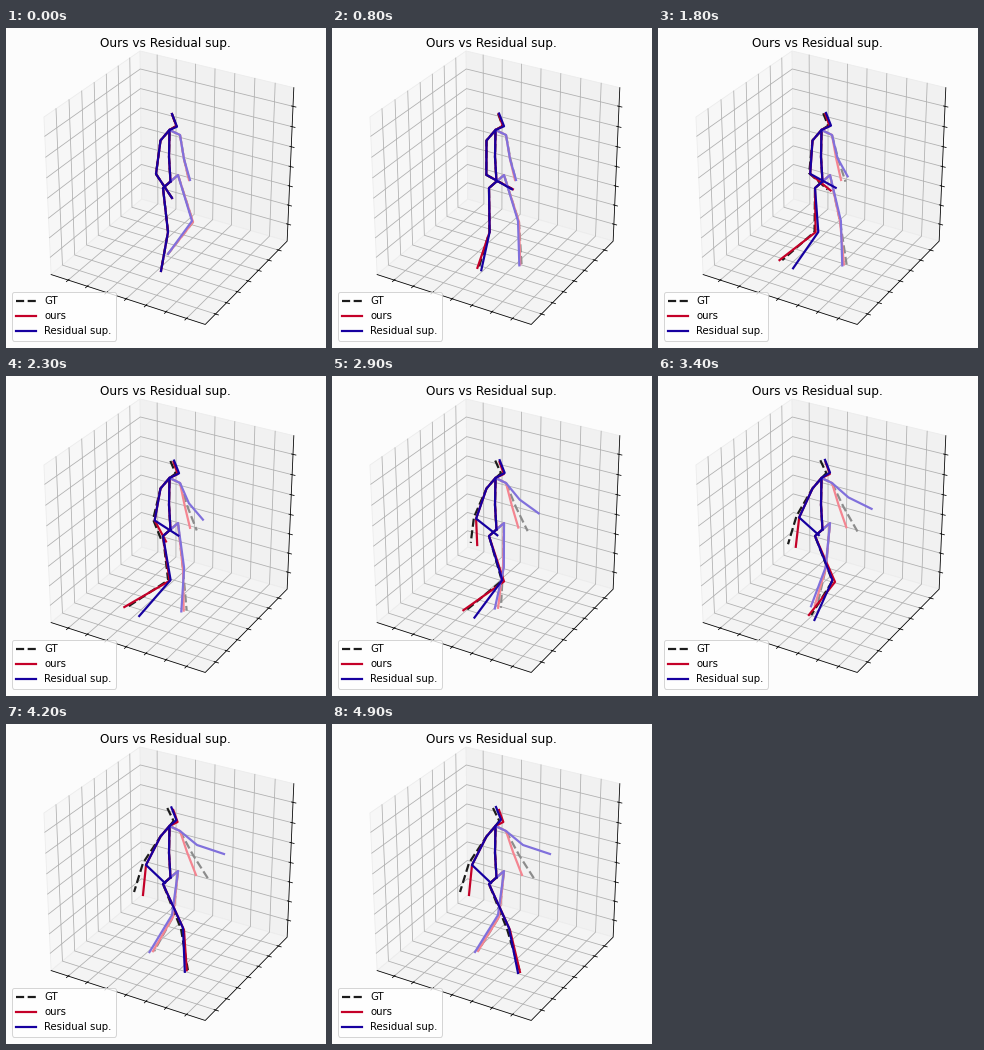
Recreate the animation shown at these times as a matplotlib script. Size 320x320 px, loop 5000 ms.

```python
import numpy as np
import matplotlib.pyplot as plt
from matplotlib.animation import FuncAnimation
from matplotlib.patches import Polygon

SIZE, DPI = 320, 80
FRAMES, INTERVAL = 50, 100
LAST = 47  # final step of the walk
PX = 72 / DPI  # points per pixel

fig = plt.figure(figsize=(SIZE / DPI, SIZE / DPI), dpi=DPI, facecolor="#fcfcfc")
ax = fig.add_axes([0, 0, 1, 1])
ax.set_xlim(0, SIZE)
ax.set_ylim(SIZE, 0)
ax.axis("off")


# ---- 3D box -------------------------------------------------------------
ELEV, AZIM, DIST, SCALE = np.radians(29), np.radians(-60), 8.5, 1510
CENTER = np.array([165.3, 154])
TOWARD = np.array([np.cos(ELEV) * np.cos(AZIM), np.cos(ELEV) * np.sin(AZIM), np.sin(ELEV)])
RIGHT = np.array([-np.sin(AZIM), np.cos(AZIM), 0])
UP = np.cross(TOWARD, RIGHT)


def project(*points):
    p = np.array(points, float)
    flat = np.stack([p @ RIGHT, -(p @ UP)], axis=1)
    return CENTER + SCALE * flat / (DIST - p @ TOWARD)[:, None]


def stroke(points, color, z=1):
    ax.plot(*project(*points).T, color=color, lw=0.8 * PX, zorder=z)


H = 0.5
PANES = [
    ("#f7f7f7", [(-H, -H, -H), (-H, H, -H), (-H, H, H), (-H, -H, H)]),
    ("#f1f1f1", [(-H, H, -H), (H, H, -H), (H, H, H), (-H, H, H)]),
    ("#f4f4f4", [(-H, -H, -H), (H, -H, -H), (H, H, -H), (-H, H, -H)]),
]
for shade, corners in PANES:
    ax.add_patch(Polygon(project(*corners), facecolor=shade, edgecolor="#ececec",
                         lw=0.8 * PX, zorder=0))

OUT, IN = H + 0.018, H - 0.009
for t in 0.128 * np.arange(-3, 4):
    stroke([(t, -H, -H), (t, H, -H), (t, H, H)], "#b0b0b0")
    stroke([(H, t, -H), (-H, t, -H), (-H, t, H)], "#b0b0b0")
    stroke([(-H, -H, t), (-H, H, t), (H, H, t)], "#b0b0b0")
    stroke([(t, -IN, -H), (t, -OUT, -H)], "black", z=2)
    stroke([(IN, t, -H), (OUT, t, -H)], "black", z=2)
    stroke([(IN, H, t), (OUT, H, t)], "black", z=2)
stroke([(-H, -H, -H), (H, -H, -H), (H, H, -H), (H, H, H)], "black", z=2)


# ---- Walk, in pixels ----------------------------------------------------
def ease(step, start, end):
    u = np.clip((step - start) / (end - start), 0, 1)
    return u * u * (3 - 2 * u)


def swing(step, *keys):
    """Ease through (step, x, y) keys, holding the first and last."""
    pos = np.array(keys[0][1:], float)
    for (t0, *a), (t1, *b) in zip(keys, keys[1:]):
        pos += np.subtract(b, a) * ease(step, t0, t1)
    return pos


def nod(step, shift, sway):
    u = step / LAST
    return np.array([166, 86]) + u * np.array(shift) + [sway * np.sin(np.pi * u), 0]


def torso():
    fixed = dict(thorax=(163.5, 102), spine=(163, 129), pelvis=(164.5, 153.5),
                 near_shoulder=(154.5, 112.5), far_shoulder=(174, 107),
                 near_hip=(157, 160), far_hip=(172, 147))
    return {name: np.array(p, float) for name, p in fixed.items()}


def residual(s):
    head = nod(s, (-2, -3), 3)
    return dict(
        torso(), head=head, neck=head + [5, 12.7],
        near_elbow=swing(s, (0, 150, 146), (9, 155, 147), (38, 140, 141)),
        near_wrist=swing(s, (0, 166, 170), (9, 182, 160), (38, 159, 159)),
        far_elbow=swing(s, (12, 178, 131), (36, 191, 121)),
        far_wrist=swing(s, (9, 184, 152), (40, 218, 130)),
        near_knee=swing(s, (0, 162, 204), (9, 157, 204), (40, 177, 204)),
        near_ankle=swing(s, (0, 155, 243), (21, 133, 240), (47, 186, 249)),
        far_knee=swing(s, (10, 186, 193), (38, 166, 191)),
        far_ankle=swing(s, (0, 162, 226), (9, 191, 239), (43, 143, 228)))


def ours(s):
    head = nod(s, (1, 0), 1)
    return dict(
        residual(s), head=head, neck=head + [4.3, 12],
        near_wrist=swing(s, (0, 166, 170), (9, 183, 160), (35, 137, 171)),
        far_elbow=swing(s, (12, 178, 131), (41, 181, 128)),
        far_wrist=swing(s, (16, 183, 152), (41, 190, 151)),
        near_knee=swing(s, (0, 162, 204), (12, 155, 204), (36, 178, 206)),
        near_ankle=swing(s, (0, 155, 243), (21, 118, 231), (46, 188, 248)),
        far_knee=swing(s, (8, 187, 194), (36, 167, 193)),
        far_ankle=swing(s, (0, 162, 226), (9, 192, 238), (44, 146, 227)))


def truth(s):
    """Our prediction, with a drift that grows over the walk."""
    pose = ours(s)
    drift = dict(head=(-6, -2), neck=(-4, -1), near_elbow=(-3, -2), near_wrist=(-9, -3),
                 far_elbow=(6, 3), far_wrist=(13, 5), near_knee=(-3, -1))
    for name, shift in drift.items():
        pose[name] = pose[name] + np.array(shift) * ease(s, 0, 43)
    for name in ("near_ankle", "far_ankle"):
        pose[name] = pose[name] + [3 * np.sin(np.pi * s / LAST), 0]
    return pose


# Far limbs are paler and lie below the near ones.
CHAINS = [
    (True, "thorax far_shoulder far_elbow far_wrist"),
    (True, "pelvis far_hip far_knee far_ankle"),
    (False, "pelvis near_hip near_knee near_ankle"),
    (False, "head neck thorax spine pelvis"),
    (False, "thorax near_shoulder near_elbow near_wrist"),
]
PEOPLE = [
    ("GT", truth, "#1c1c1c", "#8c8c8c", "--"),
    ("ours", ours, "#c40028", "#f48591", "-"),
    ("Residual sup.", residual, "#1600a0", "#8070dc", "-"),
]

limbs, handles = [], []
for layer, (label, pose, near, far, style) in enumerate(PEOPLE):
    look = dict(lw=2.2 * PX, ls=style)
    handles.append(plt.Line2D([], [], color=near, label=label, **look))
    for is_far, chain in CHAINS:
        line, = ax.plot([], [], color=far if is_far else near, zorder=4 + layer,
                        solid_joinstyle="round", **look)
        limbs.append((line, pose, chain.split()))

ax.text(159.5, 19, "Ours vs Residual sup.", ha="center", va="baseline",
        family="DejaVu Sans", size=12.1 * PX, color="black")
legend = ax.legend(handles=handles, loc="lower left", borderaxespad=0,
                   bbox_to_anchor=(6 / SIZE, 7.5 / SIZE),
                   prop=dict(family="DejaVu Sans", size=10.15 * PX))
legend.get_frame().set_linewidth(PX)
legend.set_zorder(10)


def update(frame):
    # The walk pauses for one tick twice per loop.
    step = frame - (frame >= 7) - (frame >= 47)
    poses = {pose: pose(step) for _, pose, *_ in PEOPLE}
    for line, pose, names in limbs:
        line.set_data(*np.transpose([poses[pose][name] for name in names]))
    return [line for line, *_ in limbs]


anim = FuncAnimation(fig, update, frames=FRAMES, interval=INTERVAL,
                     repeat=True, repeat_delay=0, blit=False)
plt.show()
```
